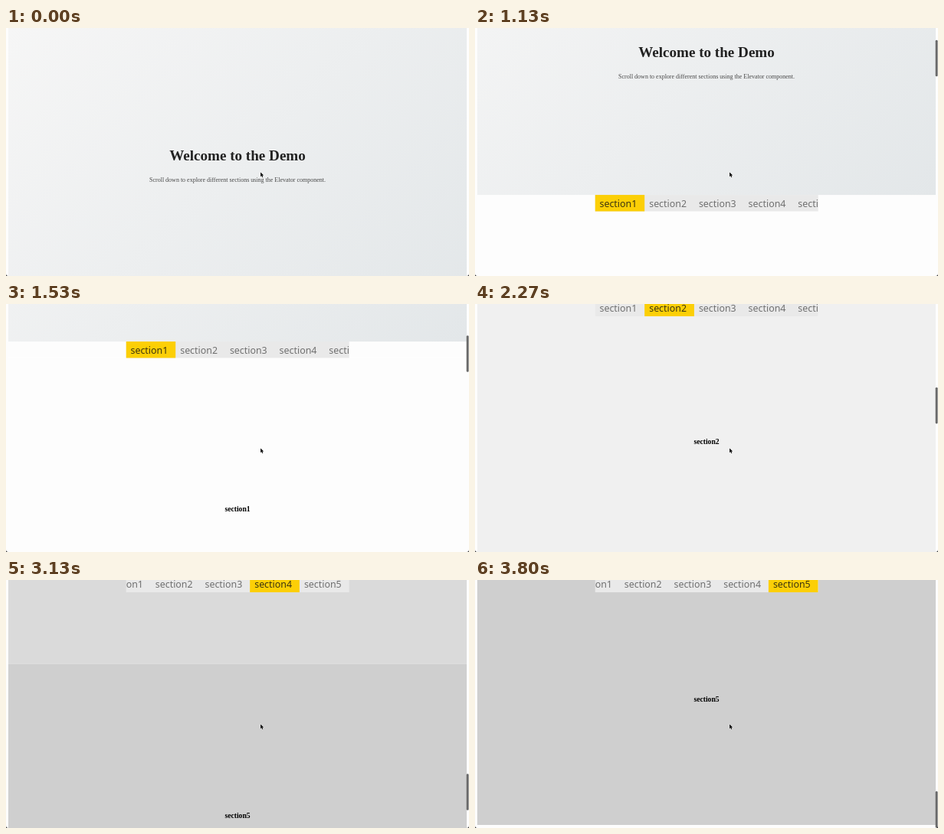
An HTML page with a canvas for the animation above (3870 ms loop, 604 by 324 pixels).

```html
<!DOCTYPE html>
<html lang="en">
<head>
<meta charset="utf-8">
<title>Elevator demo</title>
<style>
  html, body { margin: 0; width: 100%; height: 100%; overflow: hidden; background: #fdfdfd; }
  canvas { display: block; width: 604px; height: 324px; }
</style>
</head>
<body>
<canvas id="stage"></canvas>
<script>
const W = 604, H = 324, LOOP = 3870, STEP = 200 / 3;
const PAGE = { x: 3, w: 598 };
const HERO = { top: -5, bottom: 353.2 };
const NAV = { x: 156.5, w: 291.3, h: 21.6, stick: -5.4, item: 64.7 };
const SECTION = { top: 374, h: 362, label: 201, count: 5 };
const SHADES = ['#fdfdfd', '#f0f0f0', '#e5e5e5', '#dadada', '#cfcfcf'];
const SERIF = '"Liberation Serif", "Times New Roman", serif';
const SANS = '"Noto Sans", sans-serif';

// Scroll offset over time: [ms, px]
const SCROLL = [[667, 0], [733, 4], [1133, 135], [1533, 304], [2267, 754],
                [3133, 1712], [3333, 1815], [3800, 1864]];

const canvas = document.getElementById('stage');
const ctx = canvas.getContext('2d');
const dpr = window.devicePixelRatio || 1;
canvas.width = W * dpr;
canvas.height = H * dpr;
ctx.scale(dpr, dpr);

const clamp = (v, lo, hi) => Math.min(hi, Math.max(lo, v));
const smooth = v => { const u = clamp(v, 0, 1); return u * u * (3 - 2 * u); };

const slopes = SCROLL.slice(1).map(([t, y], i) => (y - SCROLL[i][1]) / (t - SCROLL[i][0]));
const tangents = SCROLL.map((_, i) => {
  const a = slopes[i - 1] || 0, b = slopes[i] || 0;
  return a && b ? 2 * a * b / (a + b) : 0;
});

// Monotone cubic through the scroll points
function scrollAt(t) {
  const last = SCROLL.length - 1;
  if (t <= SCROLL[0][0]) return 0;
  if (t >= SCROLL[last][0]) return SCROLL[last][1];
  const i = SCROLL.findIndex(p => p[0] > t) - 1;
  const [t0, y0] = SCROLL[i], [t1, y1] = SCROLL[i + 1];
  const d = t1 - t0, u = (t - t0) / d, v = 1 - u;
  return y0 * (1 + 2 * u) * v * v + y1 * u * u * (3 - 2 * u)
    + d * u * v * (v * tangents[i] - u * tangents[i + 1]);
}

function box(x, y, w, h, fill) {
  ctx.fillStyle = fill;
  ctx.fillRect(x, y, w, h);
}

function text(str, x, y, font, fill, align = 'center') {
  ctx.font = font;
  ctx.fillStyle = fill;
  ctx.textAlign = align;
  ctx.fillText(str, x, y);
}

function drawHero(off) {
  const h = HERO.bottom - HERO.top;
  const cx = PAGE.x + PAGE.w / 2, cy = HERO.top + h / 2 - off, r = (PAGE.w + h) / 4;
  const shade = ctx.createLinearGradient(cx - r, cy - r, cx + r, cy + r);
  shade.addColorStop(0, '#f6f6f6');
  shade.addColorStop(1, '#e3e7e9');
  box(PAGE.x, HERO.top - off, PAGE.w, h, shade);
  text('Welcome to the Demo', 302, 172.7 - off, 'bold 19.1px ' + SERIF, '#222');
  text('Scroll down to explore different sections using the Elevator component.',
    302, 200.7 - off, '8px ' + SERIF, '#484848');
}

function drawSections(off) {
  SHADES.forEach((shade, i) => {
    const y = SECTION.top + i * SECTION.h - off;
    box(PAGE.x, y, PAGE.w, SECTION.h, shade);
    text('section' + (i + 1), 302, y + SECTION.label, 'bold 9.65px ' + SERIF, '#000');
  });
}

function drawNav(off) {
  const y = Math.max(HERO.bottom - off, NAV.stick);
  // Distance scrolled past the point where section i becomes current
  const past = i => off - (SECTION.top + i * SECTION.h - 20);
  let active = 0;
  for (let i = 1; i < SECTION.count; i++) if (past(i) >= 0) active = i;
  const shift = 16.2 * (smooth(past(2) / 200) + smooth(past(3) / 200));

  ctx.save();
  ctx.beginPath();
  ctx.rect(NAV.x, y, NAV.w, NAV.h);
  ctx.clip();
  box(NAV.x, y, NAV.w, NAV.h, '#e9e9e9');
  for (let i = 0; i < SECTION.count; i++) {
    const x = NAV.x + i * NAV.item - shift, on = i === active;
    if (on) box(x, y, NAV.item, NAV.h, '#fccf06');
    text('section' + (i + 1), x + 6, y + 15.6, '300 12.4px ' + SANS, on ? '#3c3510' : '#707070', 'left');
  }
  ctx.restore();
}

function drawThumb(off) {
  ctx.fillStyle = '#686868';
  ctx.beginPath();
  ctx.roundRect(600.7, off * 0.1506 - 4.6, 2.9, 47.6, 1.4);
  ctx.fill();
}

function drawCursor() {
  ctx.beginPath();
  [[0, 0], [0, 5.8], [1.3, 4.7], [2.3, 6.8], [3.2, 6.4], [2.3, 4.4], [4, 4.2]]
    .forEach(([x, y]) => ctx.lineTo(332.1 + x, 188.4 + y));
  ctx.closePath();
  ctx.strokeStyle = 'rgba(255,255,255,.8)';
  ctx.lineWidth = 0.8;
  ctx.stroke();
  ctx.fillStyle = '#000';
  ctx.fill();
}

function drawCorners() {
  ctx.fillStyle = '#222';
  for (const [x, dir] of [[0, 1], [W, -1]]) {
    ctx.beginPath();
    ctx.moveTo(x, H - 3);
    ctx.quadraticCurveTo(x, H, x + 3 * dir, H);
    ctx.lineTo(x, H);
    ctx.fill();
  }
}

function draw(ms) {
  const tick = Math.floor((Math.floor(ms / 10) * 10 + 3.4) / STEP);
  const off = scrollAt(tick * STEP);
  box(0, 0, W, H, '#fdfdfd');
  drawHero(off);
  drawSections(off);
  drawNav(off);
  if (off > 0) drawThumb(off);
  drawCursor();
  drawCorners();
}

const start = performance.now();
function frame() {
  draw((performance.now() - start) % LOOP);
  requestAnimationFrame(frame);
}
frame();
</script>
</body>
</html>
```
